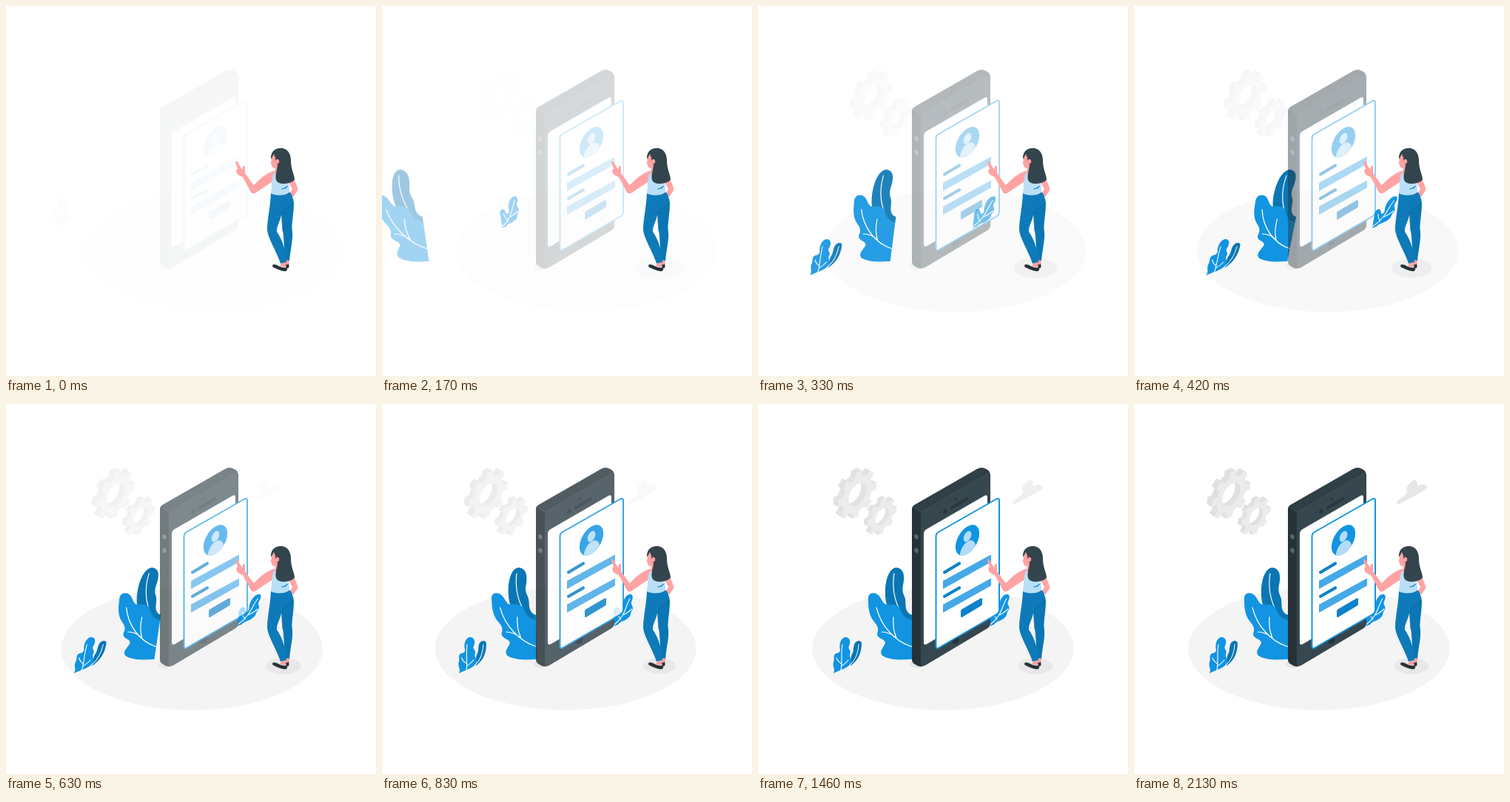
An HTML page with a canvas for the animation above (2.33 s loop, 500 px wide and 500 px high).

```html
<!DOCTYPE html>
<html lang="en">
<head>
<meta charset="utf-8">
<title>Profile screen</title>
<style>
html, body { margin: 0; width: 100%; height: 100%; overflow: hidden; background: #fff; }
canvas { display: block; width: 500px; height: 500px; }
</style>
</head>
<body>
<canvas id="stage"></canvas>
<script>
const LOOP = 2330, STEP = 1000 / 24, TICK = .04, SIZE = 500;
const BLUE = '#1294e2', DEEP = '#0b76b4', SKIN = '#ffa3a3', INK = '#263238', SLATE = '#37474f';
const stage = document.getElementById('stage');
const buffer = document.createElement('canvas');
const scale = window.devicePixelRatio || 1;
for (const c of [stage, buffer]) c.width = c.height = Math.round(SIZE * scale);
const main = stage.getContext('2d');
const side = buffer.getContext('2d');
let g = main;

const clamp = v => Math.max(0, Math.min(1, v));
const mix = (a, b, k) => a + (b - a) * k;

// cubic-bezier(.36, -.01, .5, 1.38)
function spring(x) {
  if (x <= 0) return 0;
  if (x >= 1) return 1;
  const at = (s, a, b) => 3 * (1 - s) ** 2 * s * a + 3 * (1 - s) * s * s * b + s ** 3;
  let lo = 0, hi = 1;
  for (let i = 0; i < 30; i++) {
    const m = (lo + hi) / 2;
    if (at(m, .36, .5) < x) lo = m; else hi = m;
  }
  return at(lo, -.01, 1.38);
}

function fill(d, color, rule = 'nonzero') {
  g.fillStyle = color;
  g.fill(typeof d === 'string' ? new Path2D(d) : d, rule);
}

function line(d, color, width) {
  g.strokeStyle = color;
  g.lineWidth = width;
  g.lineCap = g.lineJoin = 'round';
  g.stroke(new Path2D(d));
}

function oval(x, y, rx, ry, color, turn = 0) {
  const p = new Path2D();
  p.ellipse(x, y, rx, ry, turn, 0, Math.PI * 2);
  fill(p, color);
}

// Run a drawing as one group with shared opacity
function group(alpha, draw) {
  if (alpha <= 0) return;
  side.setTransform(1, 0, 0, 1, 0, 0);
  side.clearRect(0, 0, buffer.width, buffer.height);
  side.setTransform(scale, 0, 0, scale, 0, 0);
  g = side;
  draw();
  g = main;
  main.globalAlpha = clamp(alpha);
  main.drawImage(buffer, 0, 0, SIZE, SIZE);
  main.globalAlpha = 1;
}

// Place a drawing on the upright isometric plane
function onWall(x, y, draw) {
  g.save();
  g.transform(.866, -.5, 0, 1, x, y);
  draw();
  g.restore();
}

function gearPath(r, hole) {
  const p = new Path2D(), n = 8;
  for (let i = 0; i < n; i++) {
    for (const [k, q] of [[-.28, .78], [-.2, 1], [.2, 1], [.28, .78]]) {
      const a = (i + k + .12) / n * Math.PI * 2;
      p.lineTo(Math.cos(a) * r * q, Math.sin(a) * r * q);
    }
  }
  p.closePath();
  p.moveTo(hole, 0);
  p.arc(0, 0, hole, 0, Math.PI * 2);
  return p;
}

function gear(x, y, r, hole, depth) {
  const p = gearPath(r, hole);
  for (let i = depth; i >= 0; i -= .5)
    onWall(x - i, y - i * .5, () => fill(p, i ? '#e0e0e0' : '#ebebeb', 'evenodd'));
}

function gears(t) {
  const k = 1 - (1 - clamp((t - .19) / 1.8)) ** 2;
  group(k, () => {
    g.translate(30 * (1 - k), 0);
    gear(131.5, 122.5, 30, 14, 7);
    gear(165, 152, 23, 10.5, 5);
  });
}

function cloud(t) {
  const k = clamp((t - .5) / 1.5);
  group(k, () => {
    g.translate(-30 * (1 - k), 0);
    fill('M356 136C354 133 357 130 361 127C365 125 368 122 369 120C367 114 370 108 374 106' +
      'C375 103 381 101 382 105C383 107 383 109 383 111C387 108 393 108 396 111' +
      'C396 114 394 116 390 118L361 134Z', '#e6e6e6');
  });
}

function ground(t) {
  const k = spring(t);
  group(k, () => {
    g.translate(30 * (1 - k), 0);
    oval(250, 330.5, 176.5, 83, '#f4f4f4');
  });
  group(k, () => {
    const z = mix(1.5, 1, k);
    oval(375, 354, 23 * z, 11 * z, '#e8e8e8');
  });
}

function bigPlant() {
  fill('M174 271C169 253 173 222 187 221C196 222 198 230 197 239C196 246 194 251 197 258' +
    'C201 265 198 272 201 279C203 283 206 284 208 285V293L182 284Z', DEEP);
  line('M184 229C181 246 184 264 191 277', '#fff', 1.2);
  fill('M149 265C148 257 153 254 159 256C167 259 167 270 174 271C182 270 190 271 192 277' +
    'C195 287 202 291 208 292V345C192 346 177 346 168 340C163 334 170 329 172 323' +
    'C172 317 161 318 161 310C164 303 161 299 156 293C150 285 149 275 149 265Z', BLUE);
  line('M160 275C166 300 185 321 208 328M183 288C182 299 184 309 187 316' +
    'M167 308C174 308 181 311 187 316', '#fff', 1.2);
}

function smallPlant() {
  fill('M125 354C127 349 124 344 127 338C130 334 128 328 131 323C134 319 140 319 140 324' +
    'C140 335 136 346 125 354Z', DEEP);
  line('M136 325C135 337 132 345 125 352', '#fff', 1);
  fill('M102 364C105 358 100 354 102 349C104 345 101 342 104 338C107 336 111 337 111 332' +
    'C109 325 112 316 118 315C124 315 126 321 123 327C121 331 125 332 125 336' +
    'C122 341 127 344 126 349C123 357 109 360 102 364Z', BLUE);
  line('M114 325C112 338 114 351 112 360M106 343C108 348 111 350 113 351M122 346C119 350 116 352 113 354',
    '#fff', 1.1);
}

function sidePlant() {
  fill('M314 300C313 293 314 286 313 280C315 273 320 273 321 278C322 282 326 282 326 276' +
    'C325 268 330 257 337 257C341 258 340 263 338 267C336 271 341 273 339 278' +
    'C335 282 338 285 333 289C328 294 322 293 319 298Z', BLUE);
  line('M336 263C330 272 329 287 314 298M338 277C334 281 330 283 327 285M318 281C319 287 321 289 323 291',
    '#fff', 1.1);
}

function plants(t) {
  let x = 0, skew = 0, alpha = 1;
  if (t < .6) {
    const k = spring(t / .6);
    x = mix(-250, 0, k);
    skew = mix(20, -10, k);
    alpha = k;
  } else if (t < .8) skew = mix(-10, 2, spring((t - .6) / .2));
  else skew = mix(2, 0, spring((t - .8) / .2));
  const lean = Math.tan(skew * Math.PI / 180);
  group(alpha, () => {
    g.transform(1, 0, lean, 1, x - 293 * lean, 0);
    bigPlant();
    smallPlant();
    sidePlant();
  });
}

function handset() {
  oval(214, 352, 9, 5, '#e4e4e4');
  fill('M208 142Q208 138 212 136L296 88Q301 85 306 87L310 89Q314 92 314 97V296' +
    'Q314 300 310 303L226 353Q221 356 216 354L211 351Q208 349 208 345Z', INK);
  fill('M210 138L296 88Q301 85 306 87L310 89Q313 91 313 93L224 144Q221 146 220 148Z', '#303e45');
  fill('M220 151Q220 147 224 144L308 95Q314 92 314 98V296Q314 300 310 303L226 353Q220 356 220 350Z', SLATE);
  line('M210.5 139.5L220.5 146L312 93', '#46575f', .7);
  fill('M224 176Q224 171 228 169L306 124Q310 122 310 126V271Q310 275 306 278L229 324Q224 327 224 322Z', '#fff');
  line('M261.5 140.5L282.5 128', '#2a373e', 3.8);
  oval(252.8, 145, 2.6, 3.5, '#2a373e', .3);
  oval(267, 128, 1.2, 1.5, INK);
  oval(266, 318, 5.5, 6, INK, .3);
  for (const y of [179.5, 198]) oval(214, y, 2.6, 3.4, '#546870', -.4);
}

function field(y) {
  fill(`M250 ${y}L315 ${y - 35.5}V${y - 25.5}L250 ${y + 11}Z`, '#45a9e7');
}

function panel() {
  const frame = 'M240.5 179Q240.5 175 244 173L322 128.5Q326 126.5 326 130V278' +
    'Q326 282 322 284.5L245 329Q240.5 332 240.5 327Z';
  fill(frame, '#fff');
  line(frame, BLUE, 2);
  onWall(283, 184, () => {
    const disc = new Path2D();
    disc.arc(0, 0, 18.6, 0, Math.PI * 2);
    fill(disc, BLUE);
    g.save();
    g.clip(disc);
    oval(0, -5, 6.2, 6.7, '#b4dcf6');
    oval(.5, 15.5, 12.3, 13.5, '#b4dcf6');
    g.restore();
  });
  line('M252 227.5L272 215.5M252 260L272 248.5', '#0f82ca', 4.2);
  field(239);
  field(271);
  fill('M274 280Q274 278 276 277L301 262.5Q303 261.5 303 264V270Q303 272 301 273L276 288Q274 289 274 287Z', '#0f82ca');
}

function phone(t) {
  group(clamp(t), () => {
    handset();
    panel();
  });
}

function woman() {
  // ankles and shoes
  fill('M371 345H379L379 353L369 352L372 349ZM377 342H383L382 350H378Z', SKIN);
  fill('M378 349Q380 351 382 348Q383 352 382 354L379 354Z', INK);
  fill('M361 349.5C365 348 368 352 373 353Q377 354 380 353Q381 357 378 358.5' +
    'C370 358 366 355 361 353Q359 351 361 349.5Z', INK);
  // far arm
  fill('M383 234Q389 233 391 238L394 246Q395 249 392 252L388 258L384 253L387 247L383 240Z', SKIN);
  // trousers
  fill('M372 268C373 283 373 290 374 303C376 317 376 330 376 343L383 344' +
    'C384 331 388 316 387 305C385 296 389 283 389 266Q388 256 382 251Z', DEEP);
  fill('M358 253C366 256 376 256 383 251Q388 255 387 264C385 274 376 278 372 283' +
    'C370 292 365 299 366 305C374 317 378 330 379 346L371 348C365 330 354 314 353 303' +
    'C353 287 357 274 358 253Z', '#0e7ab9');
  line('M386 268C382 273 376 273 373 280C372 289 374 296 374 304', '#09619a', .8);
  // top
  fill('M360 223L367 223C370 230 374 235 382 237C383 243 382 248 384 251' +
    'C377 257 364 257 358 253C358 246 361 242 357 235Z', '#b9e0f8');
  line('M373 247Q377 247 380 244', DEEP, 1.2);
  // pointing arm and hand
  fill('M362 223C353 225 344 233 336 241Q334 243 333 240L323 226Q323 221 323 217' +
    'Q321 214 320 218L319 221L313 211Q311 208 310 211L313 220Q310 222 312 226Q315 230 320 231' +
    'L330 250Q333 256 338 252L359 238Z', SKIN);
  // head
  fill('M360 200C358 206 359 209 358 212Q357 214 359 214Q359 219 363 219Q365 222 361 225' +
    'Q364 228 368 226L372 206Z', SKIN);
  fill('M358 207C357 197 364 192 371 192C381 192 385 200 385 209C385 221 390 228 390 235' +
    'C383 241 371 242 366 237C362 231 367 221 367 214Q364 211 364 205L362 200Q360 204 358 207Z', '#34444c');
  oval(366.8, 210, 2.4, 3, SKIN);
}

function render(ms) {
  const n = ms < 80 ? 1 : Math.floor((ms + 4) / STEP) + 1;
  const t = n * TICK;
  main.setTransform(scale, 0, 0, scale, 0, 0);
  main.fillStyle = '#fff';
  main.fillRect(0, 0, SIZE, SIZE);
  ground(t);
  gears(t);
  cloud(t);
  plants(t);
  phone(t);
  woman();
}

const start = performance.now();
function tick() {
  render((performance.now() - start) % LOOP);
  requestAnimationFrame(tick);
}
tick();
</script>
</body>
</html>
```
